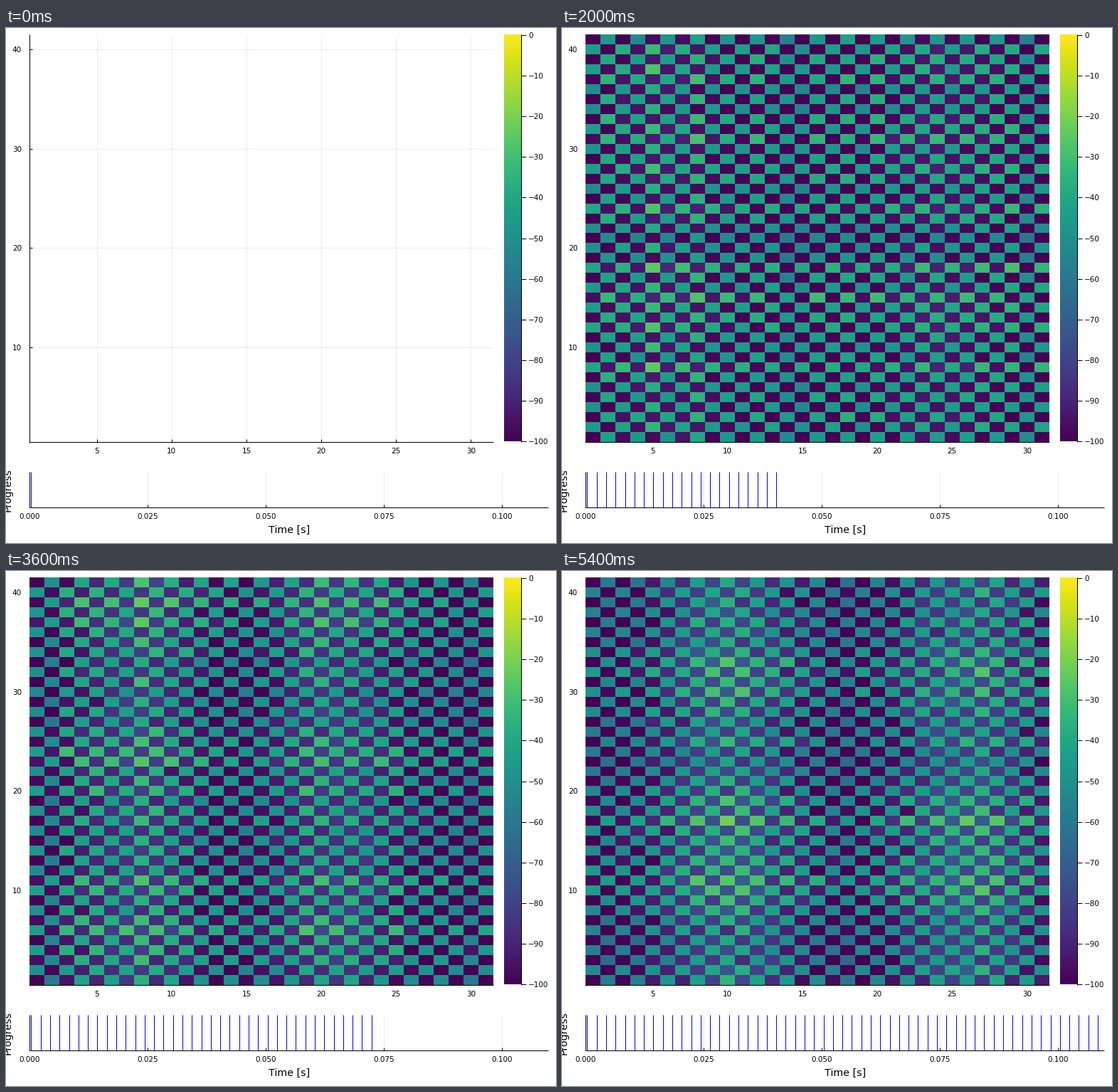
Write a matplotlib script that moves like this. It is 773x724 px and loops after 5500 ms.

```python
import numpy as np
import matplotlib.pyplot as plt
from matplotlib.animation import FuncAnimation

W, H, DPI = 773, 724, 100
NX, NY = 31, 41
FRAMES, INTERVAL = 55, 100
LEFT, RIGHT, TOP, BOTTOM = 33, 685, 9, 582
SCALE_X0, SCALE_X1, SCALE_BOTTOM = 700, 723.5, 581
STRIP_TOP, STRIP_BOTTOM, STRIP_RIGHT = 624, 674, 762
PX_PER_SEC = 6644
SOURCE = (8, 11)
STEPS = 7          # mesh updates per picture
MIXED = 15         # from here on the pulse fills the whole room

plt.rcParams["font.family"] = "DejaVu Sans"
xs, ys = np.arange(1, NX + 1), np.arange(1, NY + 1)
X, Y = np.meshgrid(xs, ys)

# centres of the loud columns and rows as they drift
TIMES = (15, 25, 32, 41, 49, 54)
COL_PEAKS = ((6, 6, 5, 11, 13, 10), (24, 24, 20, 22, 26, 26))
ROW_PEAKS = ((37, 37, 36, 37, 33, 32), (28, 28, 24, 23, 14, 16), (13, 13, 6, 8, 4, 11))


def neighbours(u):
    p = np.pad(u, 1, mode="reflect")
    return 0.5 * (p[:-2, 1:-1] + p[2:, 1:-1] + p[1:-1, :-2] + p[1:-1, 2:])


def spreading_wave():
    """Pulse running over a rectangular mesh; cells not reached stay empty."""
    old = np.zeros((NY, NX))
    old[SOURCE[1] - 1, SOURCE[0] - 1] = 1
    now = neighbours(old) / 2
    reach = abs(X - SOURCE[0]) + abs(Y - SOURCE[1])
    fields = [np.full((NY, NX), np.nan)]
    for n in range(1, MIXED * STEPS):
        if n % STEPS == 0:
            level = 20 * np.log10(abs(now) + 1e-6) - 8
            fields.append(np.where(reach <= n, level, np.nan))
        old, now = now, neighbours(now) - old
    return fields


WAVE = spreading_wave()


def bumps(axis, tracks, i, width):
    """Smooth humps, 0 to 1, around the drifting centres."""
    centres = [np.interp(i, TIMES, track) for track in tracks]
    return np.max([np.exp(-((axis - c) / width) ** 2) for c in centres], axis=0)


def field(i):
    """Level in dB of every cell; the two checkerboard halves swap each time."""
    if i < MIXED:
        return WAVE[i]
    rng = np.random.default_rng(100 + i)
    age = np.sqrt((i - MIXED) / (FRAMES - 1 - MIXED))
    jitter = 4.5 - 2 * age
    hump = bumps(xs, COL_PEAKS, i, 5)
    cols = 20 * age * (hump - 0.5) + jitter * rng.normal(size=NX)
    rows = 11 * age * (bumps(ys, ROW_PEAKS, i, 4) - 0.9) + jitter * rng.normal(size=NY)
    rows = rows[:, None]

    active = -41 + cols + rows + 1.5 * rng.normal(size=(NY, NX))
    idle = -103 + 27 * age * hump + 0.4 * rows + 3 * age * rng.normal(size=(NY, NX))
    return np.where((X + Y + i) % 2 == 1, active, idle)


fig = plt.figure(figsize=(W / DPI, H / DPI), dpi=DPI, facecolor="white")
ax = fig.add_axes([0, 0, 1, 1])
ax.axis("off")


def px(size):
    return size * 72 / DPI


def line(x0, y0, x1, y1, width=1.0, z=2, alpha=1):
    ax.plot([x0, x1], [y0, y1], color="black", lw=px(width), zorder=z,
            alpha=alpha, solid_capstyle="butt")


def label(x, y, text, size=10.4, ha="center", va="center_baseline", **kw):
    ax.text(x, y, text, fontsize=px(size), ha=ha, va=va, **kw)


def grid(x0, y0, x1, y1):
    line(x0, y0, x1, y1, width=0.7, z=1, alpha=0.1)


# heatmap axes
for v in range(5, 31, 5):
    x = LEFT + (v - 0.5) / NX * (RIGHT - LEFT)
    grid(x, TOP, x, BOTTOM)
    line(x, BOTTOM, x, BOTTOM - 4)
    label(x, 594, str(v))
for v in range(10, 41, 10):
    y = BOTTOM - (v - 0.5) / NY * (BOTTOM - TOP)
    grid(LEFT, y, RIGHT, y)
    line(LEFT, y, LEFT + 4, y)
    label(22, y, str(v), ha="right")
line(LEFT, TOP, LEFT, BOTTOM + 0.5)
line(LEFT - 0.5, BOTTOM, RIGHT, BOTTOM)

scale = dict(cmap="viridis", vmin=-100, vmax=0, aspect="auto", interpolation="nearest")
heat = ax.imshow(np.full((NY, NX), np.nan), extent=(LEFT, RIGHT, BOTTOM, TOP),
                 zorder=3, **scale)

# colour bar
ax.imshow(np.linspace(0, -100, 256)[:, None],
          extent=(SCALE_X0, SCALE_X1, SCALE_BOTTOM, TOP), zorder=3, **scale)
line(SCALE_X1, TOP, SCALE_X1, SCALE_BOTTOM + 0.5, z=4)
for v in range(0, 101, 10):
    y = TOP + 0.8 + v / 100 * (SCALE_BOTTOM - TOP - 0.5)
    line(SCALE_X1, y, 731, y, z=4)
    label(734, y, f"\u2212{v}" if v else "0", ha="left")

# progress strip
for k in range(5):
    x = LEFT + k * 0.025 * PX_PER_SEC
    grid(x, STRIP_TOP, x, STRIP_BOTTOM)
    line(x, STRIP_BOTTOM, x, STRIP_BOTTOM - 4)
    label(x, 686, f"{k * 0.025:.3f}")
line(LEFT, STRIP_TOP, LEFT, STRIP_BOTTOM)
line(LEFT - 0.5, STRIP_BOTTOM, STRIP_RIGHT, STRIP_BOTTOM)
label(398, 704.5, "Time [s]", size=14.2)
label(7, 650, "Progress", size=14.2, va="baseline",
      rotation=90, rotation_mode="anchor")
ticks = ax.vlines([], STRIP_TOP, STRIP_BOTTOM, colors="blue", zorder=5,
                  linewidths=px(1))

ax.set_xlim(0, W)
ax.set_ylim(H, 0)


def draw(i):
    heat.set_data(np.clip(field(i)[::-1], -100, 0))
    at = LEFT + 0.4 + (0.0003 + 0.002 * np.arange(i + 1)) * PX_PER_SEC
    ticks.set_segments([[(x, STRIP_TOP), (x, STRIP_BOTTOM)] for x in at])
    return heat, ticks


anim = FuncAnimation(fig, draw, frames=FRAMES, interval=INTERVAL, repeat=True,
                     repeat_delay=0, blit=False)
plt.show()
```
